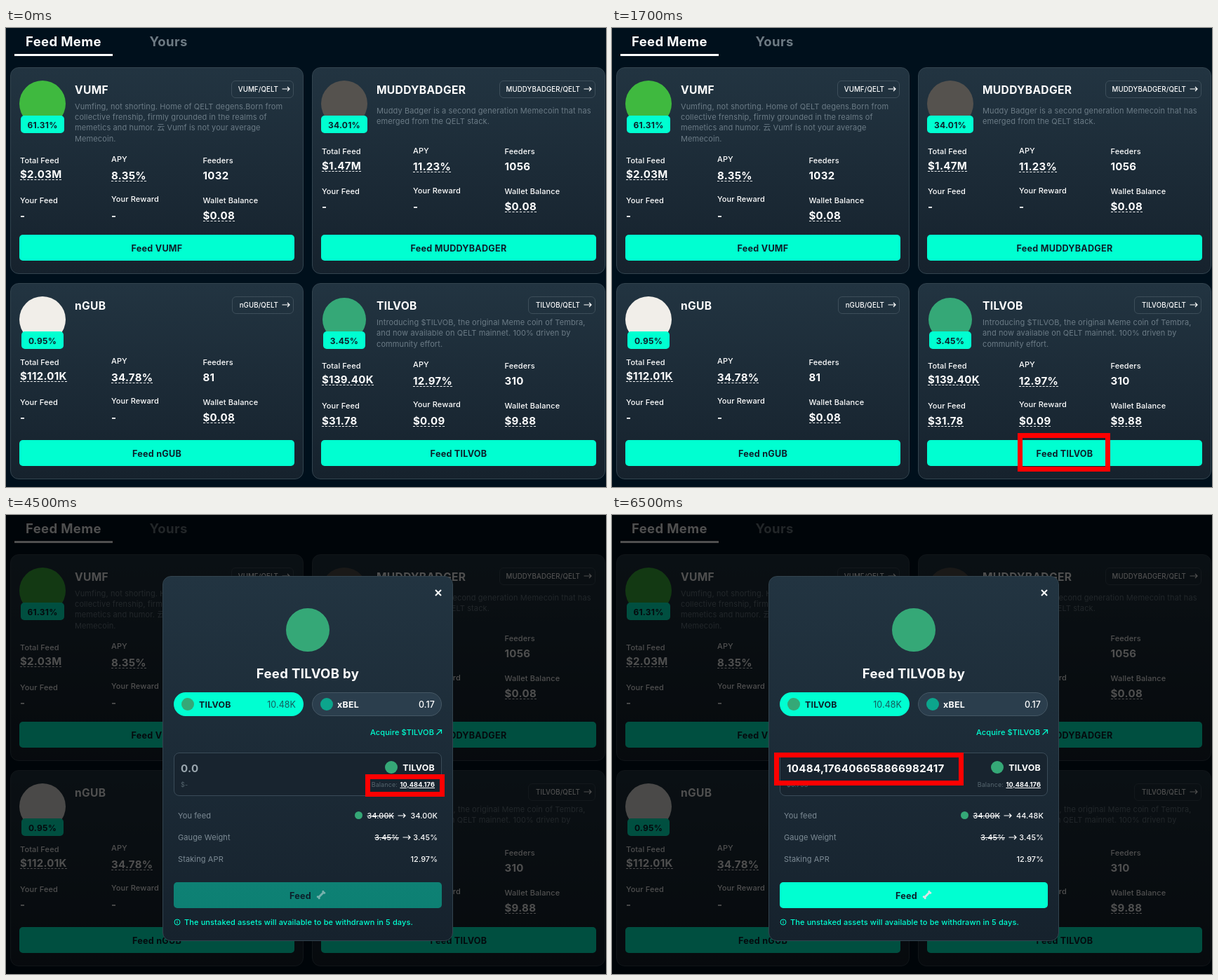
An HTML page that plays this animation: 855x655 px, repeating every 8000 ms.

```html
<!DOCTYPE html>
<html lang="en">
<head>
<meta charset="utf-8">
<title>Feed Meme</title>
<style>
html, body { margin: 0; width: 100%; height: 100%; overflow: hidden; background: #00101c; }
#stage { position: relative; width: 855px; height: 655px; overflow: hidden; color: #fff;
  font: 500 11px/15px Inter, "Noto Sans CJK SC", "Noto Sans", sans-serif; letter-spacing: .01em; }
#stage div, #stage span, #stage svg { position: absolute; box-sizing: border-box; }
#stage span { white-space: pre; }
#shade, #modal { inset: 0; }
#shade { background: rgba(0, 0, 0, .69); }
.panel { background: linear-gradient(#223441, #16222d); border: 1px solid #33444f; border-radius: 12px; }
.teal { background: #00ffd1; border-radius: 5px; }
.chip { border: 1px solid #3d4e5a; border-radius: 6px; }
.mark { border: 7px solid #f00; }
.head, .name, .val, .btn, .tag, .coin { font-weight: 700; letter-spacing: .02em; }
.head { font-size: 18.5px; }
.off { color: #6d7a83; }
.name { font-size: 15.6px; }
.val { font-size: 15px; }
.dash { border-bottom: 1px dashed #fff; }
.btn { font-size: 12.6px; color: #0c1f2a; }
.tag { font-size: 12px; color: #0c1f2a; }
.coin { font-size: 12.4px; }
.dark { color: #0c1f2a; }
.desc { font-weight: 400; color: #6b7b86; }
.pair { font-size: 9.7px; }
.sum { font-size: 12.4px; }
.thin { font-weight: 400; color: #145a5c; }
.row { font-weight: 400; color: #7d8b95; }
.num { font-size: 10.8px; }
.cut { text-decoration: line-through; }
.link { font-size: 11px; color: #00ffd1; }
.amount { font-size: 15.1px; }
.idle { color: #9aa6ae; }
.tiny { font-size: 9px; font-weight: 400; color: #56666f; }
.bal { font-size: 9.2px; font-weight: 700; text-decoration: underline; }
</style>
</head>
<body>
<div id="stage"></div>
<script>
const GREEN = "#35a877";

// y is the middle of the capitals; align: 0 left, .5 centre, 1 right
const text = (x, y, str, cls = "", align = 0, id = "") =>
  `<span id="${id}" class="${cls}" style="left:${x}px;top:${y - 7.5}px;transform:translateX(${-100 * align}%)">${str}</span>`;
const box = (x, y, w, h, cls, style = "", id = "") =>
  `<div id="${id}" class="${cls}" style="left:${x}px;top:${y}px;width:${w}px;height:${h}px;${style}"></div>`;
const disc = (x, y, r, color) =>
  box(x - r, y - r, 2 * r, 2 * r, "", `border-radius:50%;background:${color}`);
const icon = (x, y, size, path, style = "", id = "") =>
  `<svg id="${id}" style="left:${x - size / 2}px;top:${y - size / 2}px;${style}" width="${size}" height="${size}"
    fill="none" stroke="#fff" stroke-width="1.2"><path d="${path}"/></svg>`;
const arrow = (x, y) => icon(x, y, 12, "M.5 6H11M8 3L11 6L8 9");

function card(c) {
  const { x, y, h, base: b, name } = c;
  const left = x + 13, cols = [x + 14, x + 144, x + 274.5];
  const stat = (i, dy, label, vy, value) =>
    text(cols[i], b + dy, label) +
    text(cols[i], b + vy, value, "val" + (/[$%]/.test(value) ? " dash" : ""));
  const [feed, apy, feeders, own, reward, wallet] = c.stats;
  const btnY = y + h - 56;
  return box(x, y, 418, h, "panel") +
    disc(x + 46, y + 52, c.r, c.color) +
    box(x + 46 - c.tagW / 2, y + 69, c.tagW, 25, "teal") +
    text(x + 46, y + 82, c.share, "tag", .5) +
    text(x + 92, y + 32, name, "name") +
    box(x + 404 - c.chipW, y + 19, c.chipW, 25, "chip") +
    text(x + 382, y + 31, name + "/QELT", "pair", 1) +
    arrow(x + 392.5, y + 31) +
    c.desc.map((line, i) => text(x + 92, c.descY + i * 15.4, line, "desc")).join("") +
    stat(0, 0, "Total Feed", 19.5, feed) +
    stat(1, -1.5, "APY", 21, apy) +
    stat(2, 0, "Feeders", 21, feeders) +
    stat(0, 57, "Your Feed", 78, own) +
    stat(1, 55.5, "Your Reward", 78, reward) +
    stat(2, 57, "Wallet Balance", 78, wallet) +
    box(left, btnY, 391.5, 37, "teal") +
    text(left + 196, btnY + 19, "Feed " + name, "btn", .5);
}

const cards = [
  { x: 6, y: 56, h: 295, base: 189, name: "VUMF", r: 33, color: "#3fb93f", share: "61.31%", tagW: 62, chipW: 89,
    descY: 112, desc: ["Vumfing, not shorting. Home of QELT degens.Born from",
      "collective frenship, firmly grounded in the realms of",
      "memetics and humor. 云 Vumf is not your average", "Memecoin."],
    stats: ["$2.03M", "8.35%", "1032", "-", "-", "$0.08"] },
  { x: 436, y: 56, h: 295, base: 176.5, name: "MUDDYBADGER", r: 33, color: "#55524e", share: "34.01%", tagW: 66, chipW: 137,
    descY: 118, desc: ["Muddy Badger is a second generation Memecoin that has", "emerged from the QELT stack."],
    stats: ["$1.47M", "11.23%", "1056", "-", "-", "$0.08"] },
  { x: 6, y: 364, h: 280, base: 477, name: "nGUB", r: 33, color: "#f1eee9", share: "0.95%", tagW: 60, chipW: 88,
    descY: 420, desc: [],
    stats: ["$112.01K", "34.78%", "81", "-", "-", "$0.08"] },
  { x: 436, y: 364, h: 280, base: 482, name: "TILVOB", r: 31, color: GREEN, share: "3.45%", tagW: 60, chipW: 96,
    descY: 420.5, desc: ["Introducing $TILVOB, the original Meme coin of Tembra,",
      "and now available on QELT mainnet. 100% driven by", "community effort."],
    stats: ["$139.40K", "12.97%", "310", "$31.78", "$0.09", "$9.88"] }
];

const page =
  text(28, 19, "Feed Meme", "head") + text(204.5, 19, "Yours", "head off") +
  box(12, 37, 140, 3, "", "background:#fff") +
  cards.map(card).join("");

// shaft and four round knobs
const bone = "M4.5 11.5L11.5 4.5M3.2 10.8h.01M5.2 12.8h.01M10.8 3.2h.01M12.8 5.2h.01";
const modal =
  box(223, 87, 414, 521, "panel") +
  icon(616, 111, 10, "M1 1L9 9M9 1L1 9", "stroke-width:2") +
  disc(430, 164, 31, GREEN) +
  text(430, 226, "Feed TILVOB by", "head", .5) +
  box(239, 253, 185, 34, "teal", "border-radius:17px") +
  disc(259, 270, 9, GREEN) +
  text(275, 270, "TILVOB", "coin dark") + text(413, 270, "10.48K", "sum thin", 1) +
  box(436, 253, 185, 34, "", "border-radius:17px;background:#2b3e4d;border:1px solid #455764") +
  disc(457, 270, 9, "#0ca58c") +
  text(472, 270, "xBEL", "coin") + text(611, 270, "0.17", "sum", 1) +
  text(610, 310, "Acquire $TILVOB", "link", 1) +
  icon(617, 310, 10, "M1.5 8.5L8.5 1.5M3 1.5H8.5V7", "stroke:#00ffd1") +
  box(239, 339, 382, 62, "", "border-radius:8px;background:#18242f;border:1px solid #3a4b58") +
  text(249, 361, "", "val amount", 0, "amount") + text(249, 384.5, "", "tiny", 0, "worth") +
  disc(548.5, 360, 9, GREEN) + text(611, 360, "TILVOB", "coin", 1) +
  text(558, 384.5, "Balance:", "tiny", 1) + text(611, 384.5, "10,484.176", "bal", 1) +
  text(245, 429, "You feed", "row") + text(245, 460, "Gauge Weight", "row") + text(245, 491, "Staking APR", "row") +
  disc(502.5, 428.5, 5.5, GREEN) +
  text(553, 429, "34.00K", "num cut", 1) + arrow(564, 428.5) + text(615, 429, "", "num", 1, "total") +
  text(560, 460, "3.45%", "num cut", 1) + arrow(571, 459.5) + text(615, 460, "3.45%", "num", 1) +
  text(615, 491, "12.97%", "num", 1) +
  box(239, 524, 382, 37, "teal", "", "submit") +
  text(404, 543, "Feed", "btn") +
  icon(449, 541.5, 16, bone, "stroke:#dfe3e6;stroke-width:3;stroke-linecap:round", "bone") +
  icon(243.5, 581, 10, "M5 1A4 4 0 1 0 5 9A4 4 0 1 0 5 1M5 4.4V7.2M5 2.7V3.7", "stroke:#00ffd1;stroke-width:1") +
  text(254, 581.5, "The unstaked assets will available to be withdrawn in 5 days.", "link");

const $ = id => document.getElementById(id);
$("stage").innerHTML = page +
  '<div id="shade"></div><div id="modal">' + modal + "</div>" +
  box(578, 578, 132, 55, "mark", "", "markFeed") +
  box(512, 370, 113, 32, "mark", "", "markBalance") +
  box(231, 339, 270, 47, "mark", "", "markAmount");

const show = (id, on) => $(id).style.visibility = on ? "visible" : "hidden";

function draw(t) {
  const open = t >= 2500, filled = t >= 6500;
  show("shade", open);
  show("modal", open);
  show("markFeed", t >= 500 && !open);
  show("markBalance", t >= 4500 && !filled);
  show("markAmount", filled);
  $("amount").textContent = filled ? "10484,176406658866982417" : "0.0";
  $("amount").classList.toggle("idle", !filled);
  $("worth").textContent = filled ? "$0.793" : "$-";
  $("total").textContent = filled ? "44.48K" : "34.00K";
  $("submit").style.opacity = filled ? 1 : .42;
  $("bone").style.opacity = filled ? 1 : .5;
}

const start = performance.now();
function tick() {
  draw((performance.now() - start) % 8000);
  requestAnimationFrame(tick);
}
tick();
</script>
</body>
</html>
```
